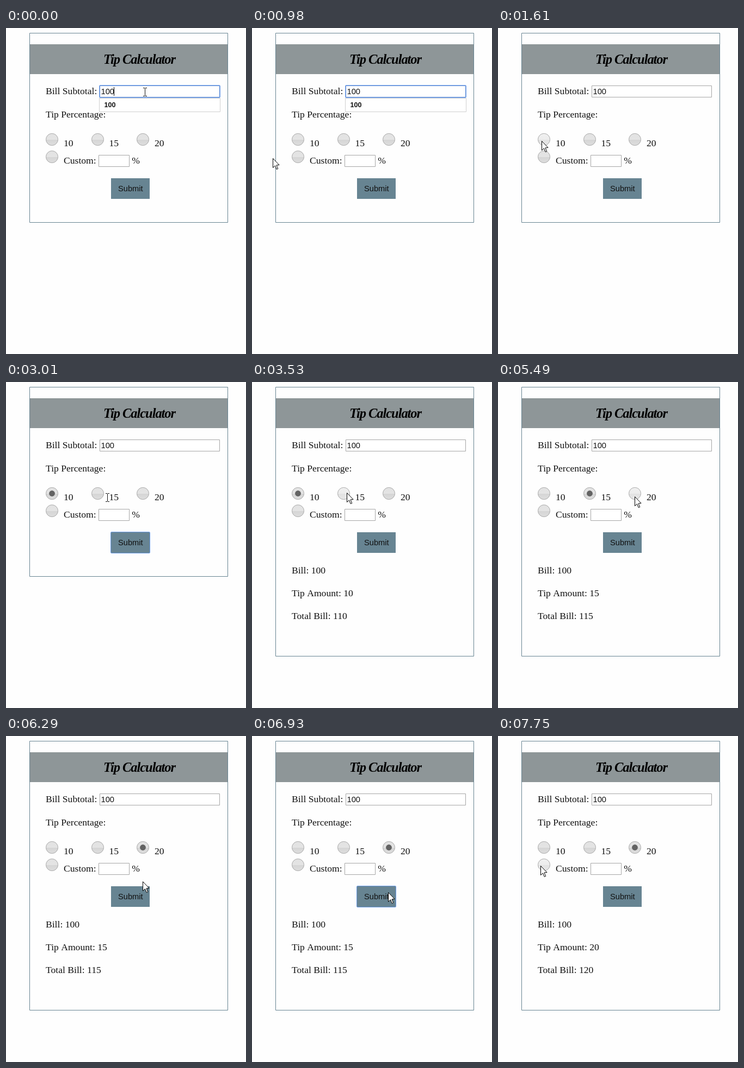
Write an HTML page with a canvas that moves like this. It is 441 px wide and 601 px high and loops after 8 s.

```html
<!DOCTYPE html>
<html lang="en">
<head>
<meta charset="utf-8">
<title>Tip Calculator</title>
<style>
html, body { margin: 0; width: 100%; height: 100%; overflow: hidden; background: #fefefe; }
canvas { display: block; }
</style>
</head>
<body>
<canvas id="stage" width="441" height="601"></canvas>
<script>
const ctx = document.getElementById('stage').getContext('2d');
const LOOP = 8000;
const STEP = 130;       // the pointer advances in steps this long
const BLINK = 530;      // caret half-period
const BLUR = 1610;      // the text field loses focus
const REPLY = 550;      // delay from pressing Submit to its result
const BILL = 100;
const SERIF = '17.6px "Liberation Serif", serif';
const SANS = '"Liberation Sans", sans-serif';
const INK = '#111';
const STEEL = '#678492';
const GREY = '#a6a6a6';

// Each move eases out from wherever the pointer is
const START = { x: 256, y: 118 };
const moves = [
  { t: 530, steps: 4, x: 39, y: 240 },
  { t: 1090, steps: 2, x: 81, y: 208 },
  { t: 1890, steps: 4, x: 225, y: 298 },
  { t: 3010, steps: 1, x: 187, y: 213 },
  { t: 3160, steps: 3, x: 175, y: 204 },
  { t: 4190, steps: 3, x: 220, y: 309 },
  { t: 4680, steps: 1, x: 225, y: 291 },
  { t: 5200, steps: 4, x: 254, y: 206 },
  { t: 6030, steps: 6, x: 251, y: 288 },
  { t: 7210, steps: 3, x: 61, y: 243 },
  { t: 7620, steps: 2, x: 79, y: 239 }
];

// One round per tip: choose it, then press Submit
const rounds = [
  { tip: 10, pick: 1750, press: 2610 },
  { tip: 15, pick: 4050, press: 4930 },
  { tip: 20, pick: 5880, press: 6930 }
];

const easeOut = f => 1 - (1 - f) ** 2;

function pointer(t) {
  let { x, y } = START;
  for (const m of moves) {
    if (t < m.t) break;
    const f = easeOut(Math.min(1, (Math.floor((t - m.t) / STEP) + 1) / m.steps));
    x += (m.x - x) * f;
    y += (m.y - y) * f;
  }
  return { x: Math.round(x), y: Math.round(y) };
}

function text(str, x, y, font = SERIF, color = INK) {
  ctx.font = font;
  ctx.fillStyle = color;
  ctx.fillText(str, x, y);
}

function box(x, y, w, h, fill, stroke) {
  ctx.fillStyle = fill;
  ctx.fillRect(x, y, w, h);
  if (stroke) outline(x, y, w, h, stroke);
}

function outline(x, y, w, h, color, radius = 0) {
  ctx.strokeStyle = color;
  ctx.lineWidth = 1;
  ctx.beginPath();
  ctx.roundRect(x + .5, y + .5, w - 1, h - 1, radius);
  ctx.stroke();
}

function focusRing(x, y, w, h) {
  outline(x, y, w, h, '#5c8ad4');
  outline(x - 1, y - 1, w + 2, h + 2, '#86aeee', 1.5);
}

function shape(points, x, y) {
  ctx.beginPath();
  points.forEach(([dx, dy]) => ctx.lineTo(x + dx, y + dy));
  ctx.closePath();
  ctx.fillStyle = '#fff';
  ctx.fill();
  ctx.strokeStyle = '#000';
  ctx.lineWidth = 1;
  ctx.stroke();
}

function title() {
  const font = 'italic bold 24.5px "Liberation Serif", serif';
  ctx.letterSpacing = '-1.05px';
  text('Tip', 179, 65.5, font, '#000');
  text('Calculator', 214, 65.5, font, '#000');
  ctx.letterSpacing = '0px';
}

function radio(x, y, checked, mouse) {
  const hover = mouse && Math.hypot(mouse.x - x, mouse.y - y) < 11.5;
  const g = ctx.createLinearGradient(0, y - 11, 0, y + 11);
  g.addColorStop(0, hover ? '#f0f0f0' : '#e2e2e2');
  g.addColorStop(.5, hover ? '#ececec' : '#e4e4e4');
  g.addColorStop(.52, hover ? '#e2e2e2' : '#d5d5d5');
  g.addColorStop(1, hover ? '#e8e8e8' : '#dedede');
  disc(x, y, 11, g);
  ctx.strokeStyle = '#a8a8a8';
  ctx.lineWidth = 1;
  ctx.stroke();
  if (checked) disc(x, y, 5.4, '#636363');
}

function disc(x, y, r, fill) {
  ctx.beginPath();
  ctx.arc(x, y, r, 0, 2 * Math.PI);
  ctx.fillStyle = fill;
  ctx.fill();
}

function arrow({ x, y }) {
  shape([[0, 0], [0, 17], [4, 13.3], [6.7, 20], [9.2, 19], [6.5, 12.4], [11.5, 12]], x - .5, y + .5);
}

function beam({ x, y }) {
  box(x - 1, y - 7, 1, 14, INK);
  for (const end of [y - 8, y + 7]) {
    box(x - 4, end, 3, 1, INK);
    box(x, end, 3, 1, INK);
  }
}

function billField(typing, caret) {
  text('Bill Subtotal:', 73, 122);
  box(172, 106, 221, 22, '#fff', GREY);
  text(BILL, 174.5, 122, '14.67px ' + SANS);
  if (!typing) return;
  focusRing(172, 106, 221, 22);
  if (caret) box(198, 109, 1, 16, '#000');
  box(171, 129, 223, 26, '#fff', '#cfcfcf');
  text(BILL, 180.5, 146, 'bold 12.5px ' + SANS);
}

function choices(picked, mouse) {
  text('Tip Percentage:', 73, 165);
  rounds.forEach((r, i) => {
    const x = 84.5 + 83.5 * i;
    radio(Math.floor(x) + .5, 205.5, r === picked, mouse);
    text(r.tip, x + 21.5, 218);
  });
  radio(84.5, 237.5, false, mouse);
  text('Custom:', 106, 250);
  box(170, 234, 57, 22, '#fff', GREY);
  text('%', 231.3, 250);
}

function draw(t) {
  const mouse = pointer(t);
  const typing = t < BLUR;
  const picked = rounds.findLast(r => t >= r.pick);
  const sent = rounds.findLast(r => t >= r.press);
  const shown = rounds.findLast(r => t >= r.press + REPLY);

  box(0, 0, 441, 601, '#fefefe');
  box(43, 9, 365, shown ? 497 : 350, '#fefefe', STEEL);
  box(44, 30, 363, 55, '#8e9698');
  title();
  choices(picked, !typing && mouse);
  billField(typing, Math.floor(t / BLINK) % 2 === 0);

  box(193, 277, 71, 38, STEEL);
  if (sent !== shown) outline(192, 276, 73, 40, '#6f9fe8', 1.5);
  text('Submit', 206, 301, '14.67px ' + SANS);

  if (shown) {
    const lines = ['Bill: ' + BILL, 'Tip Amount: ' + shown.tip, 'Total Bill: ' + (BILL + shown.tip)];
    lines.forEach((line, i) => text(line, 73, 353 + 42 * i));
  }

  // Over plain text the pointer is an I-beam
  const overField = mouse.x > 171 && mouse.y > 105 && mouse.y < 129;
  const overLabel = mouse.x > 181 && mouse.x < 207 && mouse.y > 204 && mouse.y < 222;
  (overField || overLabel ? beam : arrow)(mouse);
}

function tick(now) {
  draw(now % LOOP);
  requestAnimationFrame(tick);
}
draw(0);
requestAnimationFrame(tick);
</script>
</body>
</html>
```
